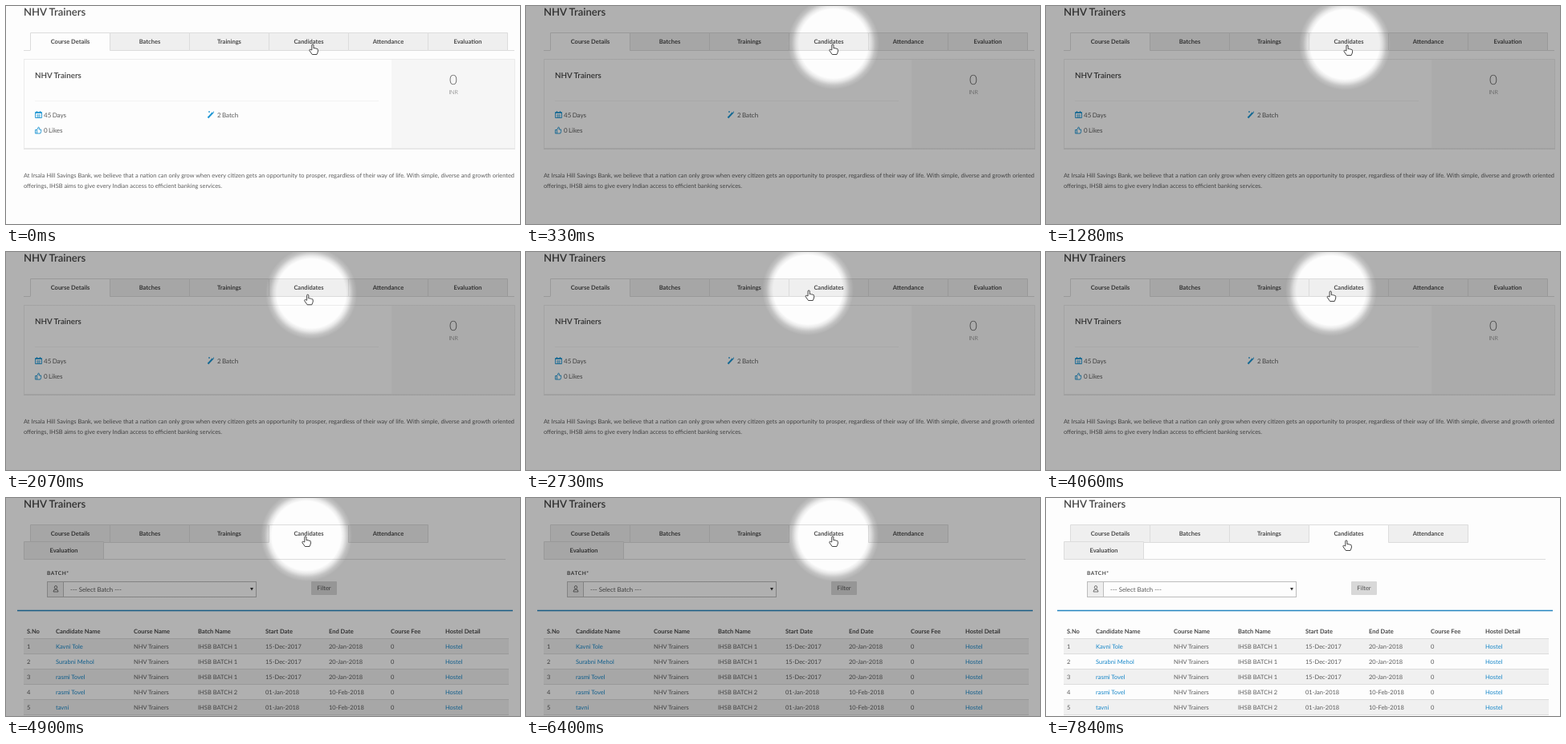
Animation, 640 px wide and 272 px high, one loop 8340 ms. Source, as an HTML page:

```html
<!DOCTYPE html>
<html lang="en">
<head>
<meta charset="utf-8">
<title>Course page</title>
<style>
html, body { margin: 0; width: 100%; height: 100%; overflow: hidden; background: #fdfdfd; }
#stage { position: absolute; left: 0; top: 0; width: 640px; height: 272px; overflow: hidden; }
svg, #shade { position: absolute; left: 0; top: 0; width: 640px; height: 272px; }
#stage { font: 7.5px Lato, sans-serif; color: #5c5c5c; text-rendering: geometricPrecision; }
text { fill: #5c5c5c; }
.b { font-weight: 700; fill: #484848; }
.mid { text-anchor: middle; }
.link { fill: #1787c9; }
.title { font-weight: 600; fill: #444; }
.fact { font-size: 8px; word-spacing: -.7px; }
.icon { fill: none; stroke: #1a94d2; stroke-width: .9; }
.rule { fill: none; stroke: #dcdcdc; }
#about { position: absolute; left: 22px; top: 204.7px; width: 611px; margin: 0; font-size: 7.4px; line-height: 13px; text-align: justify; }
</style>
</head>
<body>
<div id="stage">
  <svg viewBox="0 0 640 272">
    <text class="title" x="22" y="12" font-size="13.1">NHV Trainers</text>
    <g id="course">
      <g id="tabs1"></g>
      <path d="M22 178.5H634" stroke="#e4e4e4"/>
      <rect x="22.5" y="66.5" width="611" height="111" fill="#fdfdfd" stroke="#ebebeb"/>
      <path d="M480 67h153v110h-153z" fill="#f6f6f6"/>
      <path d="M36 118.5H464" stroke="#f3f3f3"/>
      <text class="title" x="36" y="90" font-size="9.8">NHV Trainers</text>
      <text class="fact" x="47" y="139">45 Days</text>
      <text class="fact" x="47" y="158">0 Likes</text>
      <text class="fact" x="263" y="139">2 Batch</text>
      <g class="icon">
        <path d="M36.5 132.5h8v7h-8z M36.5 133.5h8 M38.5 131v2 M42.5 131v2 M38 136h5 M38 138h5"/>
        <path d="M36.500 154.500h2v4.500h-2z M38.500 154.500l2-3.500q1.500 0 .7 3h2.300q.8 2.500-.7 5h-4.300"/>
        <path d="M251.500 139.500l6-6.500" stroke-width="2"/>
        <path d="M253 131v2 M252 132h2 M258.500 131.500v2" stroke-width=".8"/>
      </g>
      <text class="mid" x="557" y="97.5" font-size="17" font-weight="300">0</text>
      <text class="mid" x="557" y="110" font-size="7.2" font-weight="300">INR</text>
    </g>
    <g id="list">
      <g id="tabs2"></g>
      <g id="panel">
        <text class="b" x="51" y="95.5" font-size="6.5" letter-spacing=".6">BATCH*</text>
        <rect x="51.5" y="104.5" width="260" height="19" fill="#fdfdfd" stroke="#bcbcbc"/>
        <path d="M52 105h19.5v18H52z" fill="#eee"/>
        <path d="M71.5 105v18" stroke="#bcbcbc"/>
        <path d="M59 117q0-3 3-3t3 3z M60.3 111.5a1.7 2 0 1 1 3.4 0a1.7 2 0 1 1-3.4 0z" fill="none" stroke="#666" stroke-width=".9"/>
        <text x="80" y="116.5" font-size="7.8">--- Select Batch ---</text>
        <path d="M304 112h4l-2 3.5z" fill="#333"/>
        <rect x="380" y="104" width="32" height="17" rx="1" fill="#d8d8d8"/>
        <text class="mid" x="396" y="115.3" font-weight="500">Filter</text>
        <path d="M14 140.5H631" stroke="#2384bf" stroke-width="1.5"/>
        <g id="table"></g>
      </g>
    </g>
  </svg>
  <p id="about">At Irsala Hill Savings Bank, we believe that a nation can only grow when every citizen gets an opportunity to prosper, regardless of their way of life. With simple, diverse and growth oriented offerings, IHSB aims to give every Indian access to efficient banking services.</p>
  <div id="shade"></div>
  <svg viewBox="0 0 640 272">
    <path id="hand" d="M-2.2 1V-5a1.1 1.1 0 0 1 2.2 0V-1.3q1.2-.9 2 .3q1.200-.7 1.8.4q1.6-.3 1.6 1.2V3L4 6.5H-1.7L-5 1.8C-5.7.5-4.3-.3-3.4.5z" fill="#fff" stroke="#333" stroke-width=".9"/>
  </svg>
</div>
<script>
const $ = id => document.getElementById(id);
const LOOP = 8340;

const text = (x, y, s, cls = '') => `<text x="${x}" y="${y}" class="${cls}">${s}</text>`;
const rule = d => `<path class="rule" d="${d}"/>`;

function tab(x, y, name, active) {
  const fill = active ? '#fdfdfd' : '#efefef';
  return `<path d="M${x} ${y}h99v22h-99z" fill="${fill}"/>` +
    rule(`M${x} ${y + 22}V${y}h99v22${active ? '' : 'z'}`) +
    text(x + 49.5, y + 13.5, name, 'b mid');
}

const tabNames = ['Course Details', 'Batches', 'Trainings', 'Candidates', 'Attendance', 'Evaluation'];
const tabRow = (names, active) => names.map((n, i) => tab(30.5 + i * 99, 33.5, n, i === active)).join('');

$('tabs1').innerHTML = rule('M22 55.5H30M624 55.5H633') + tabRow(tabNames, 0);
$('tabs2').innerHTML = rule('M22 55.5H327M427 55.5H525') + tabRow(tabNames.slice(0, 5), 3) +
  rule('M22 76.5H622') + tab(22.5, 54.5, tabNames[5], false);

const cols = [26, 62, 159, 239, 323, 402, 479, 547];
const heads = ['S.No', 'Candidate Name', 'Course Name', 'Batch Name', 'Start Date', 'End Date', 'Course Fee', 'Hostel Detail'];
const people = ['Kavni Tole', 'Surabni Mehol', 'rasmi Tovel', 'rasmi Tovel', 'tavni'];

function personRow(name, i) {
  const y = 176 + i * 19;
  const batch = i > 2
    ? ['IHSB BATCH 2', '01-Jan-2018', '10-Feb-2018']
    : ['IHSB BATCH 1', '15-Dec-2017', '20-Jan-2018'];
  const cells = [i + 1, name, 'NHV Trainers', ...batch, 0, 'Hostel'];
  return `<path d="M22 ${y}h604v19h-604z" fill="${i % 2 ? '#fdfdfd' : '#f0f0f0'}"/>` +
    rule(`M22 ${y + 18.5}H626`) +
    cells.map((c, k) => text(cols[k], y + 11.8, c, k === 1 || k === 7 ? 'link' : '')).join('');
}

$('table').innerHTML = heads.map((h, i) => text(cols[i], 169, h, 'b')).join('') +
  rule('M22 175.5H626') + people.map(personRow).join('');

// turning points of the pointer: time, x, y
const turns = [
  [0, 383, 47], [830, 383, 47], [970, 344, 48], [1560, 396, 48], [1720, 394, 48],
  [2380, 342, 47], [3250, 395, 47], [3950, 355, 48], [4320, 374, 47], [5400, 374, 47],
  [5850, 353, 46], [6400, 383, 47], [6830, 375, 46], [7000, 375, 52], [LOOP, 375, 52]
];

// eased path between turns; leftward sweeps sag in proportion to their length
function pointer(t) {
  const i = turns.findIndex(p => p[0] > t);
  const [t0, x0, y0] = turns[i - 1];
  const [t1, x1, y1] = turns[i];
  const u = (t - t0) / (t1 - t0);
  const e = (1 - Math.cos(Math.PI * u)) / 2;
  const sag = 0.1 * Math.max(0, x0 - x1) * Math.sin(Math.PI * u) ** 2;
  return [x0 + (x1 - x0) * e, y0 + (y1 - y0) * e + sag];
}

const STEP = 133.5, PHASE = 1280 % STEP;
const sampled = t => Math.max(0, Math.floor((t - PHASE) / STEP) * STEP + PHASE);

function draw(t) {
  const s = sampled(t);
  const [x, y] = pointer(s);
  const [hx, hy] = pointer(s + 30);
  $('hand').setAttribute('transform', `translate(${hx} ${hy + 7})`);

  $('shade').style.background = `radial-gradient(circle at ${x}px ${y}px,
    transparent 43px, rgba(0,0,0,.08) 47px, rgba(0,0,0,.23) 52px, rgba(0,0,0,.305) 57px)`;
  $('shade').style.opacity = t < 20 || t >= 7840 ? 0 : t < 150 ? 0.5 : 1;

  const listed = t >= 4570;
  $('course').style.display = $('about').style.display = listed ? 'none' : '';
  $('list').style.display = listed ? '' : 'none';
  $('panel').style.opacity = t < 4750 ? 0.35 : t < 4900 ? 0.75 : 1;
}

const start = performance.now();
function tick() {
  draw((performance.now() - start) % LOOP);
  requestAnimationFrame(tick);
}
tick();
</script>
</body>
</html>
```
